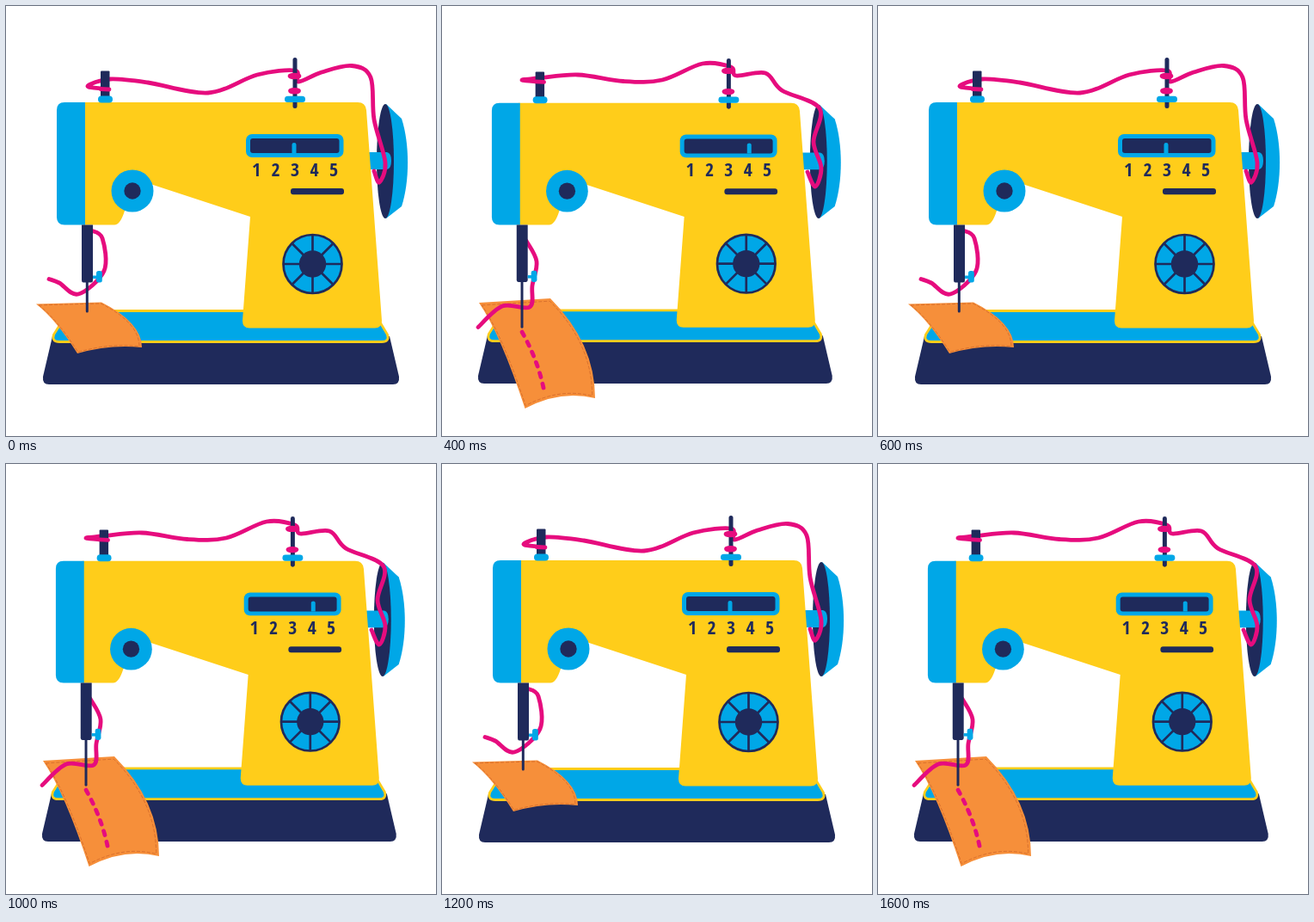
Recreate the animation shown at these times as an HTML page. Size 500 by 500 pixels, loop 1.8 s.

```html
<!DOCTYPE html>
<html lang="en">
<head>
<meta charset="utf-8">
<title>Sewing machine</title>
<style>
html, body { margin: 0; width: 100%; height: 100%; overflow: hidden; background: #fff; }
svg { display: block; width: 100vw; height: 100vh; }
.y { fill: #ffcd1a; }
.b { fill: #00a7e7; }
.n { fill: #1f2a5b; }
.navy { stroke: #1f2a5b; fill: none; }
.pink { stroke: #e60c7e; fill: none; stroke-width: 4.8; stroke-linecap: round; stroke-linejoin: round; }
.digits { font: 700 22px "Open Sans Condensed", "Noto Sans ExtraCondensed", "Noto Sans Condensed", "Open Sans", sans-serif; font-stretch: 62.5%; text-anchor: middle; }
</style>
</head>
<body>
<svg viewBox="0 0 500 500">
  <g class="machine">
    <path class="n" d="M54 384L43 431Q42 440 50 440H450Q458 440 457 431L446 384Z"/>
    <path class="b" d="M73 354.500H427L443.500 382Q446 390.500 437 390.500H62Q53 390.500 55.500 382Z" stroke="#ffcd1a" stroke-width="2.800"/>
    <path class="b" d="M442 114L460 131C469.500 160 469.500 204 460 233L442 247Z"/>
    <ellipse class="n" cx="441" cy="180.500" rx="10" ry="66.500"/>
    <path class="b" d="M418 170H443Q448 171 448 180T443 190H418Z"/>
    <path class="y" d="M90 112H409Q418 112 419 121L437 366Q437 374.500 429 374.500H283Q275 374.500 275 366L284 245L168 207L138 238Q133 254.500 126 254.500H90Z"/>
    <path class="b" d="M92 112H68Q59 112 59 121V245.500Q59 254.500 68 254.500H92Z"/>
    <circle class="b" cx="147" cy="215" r="24.500"/>
    <circle class="n" cx="147" cy="215" r="9.700"/>
    <rect class="b" x="279" y="149" width="113.500" height="27" rx="7"/>
    <rect class="n" x="284" y="154" width="103.500" height="17" rx="3"/>
    <path id="mark" class="b" d="M-2.500 171V161Q-2.500 159 0 159T2.500 161V171Z"/>
    <g id="digits" class="n digits"></g>
    <rect class="n" x="331" y="212" width="62" height="7.200" rx="3"/>
    <circle class="b" cx="356.500" cy="300" r="34"/>
    <g id="dial" class="navy" stroke-width="2.700"><circle cx="356.500" cy="300" r="34"/></g>
    <circle class="n" cx="356.500" cy="300" r="15.700"/>
  </g>
  <path id="cloth" fill="#f68f3a"/>
  <path id="hem" fill="none" stroke="#d96f2c" stroke-dasharray="4 2"/>
  <path id="seam" class="pink" stroke-dasharray="5 8"/>
  <path id="lower" class="pink"/>
  <path id="upper" class="pink"/>
  <g class="machine">
    <rect class="n" x="110" y="75.500" width="10.500" height="31" rx="1"/>
    <rect class="b" x="107" y="104.500" width="17" height="8" rx="4"/>
    <path class="navy" d="M336 62.500V116.500" stroke-width="5" stroke-linecap="round"/>
    <rect class="b" x="324" y="104.800" width="24" height="7.200" rx="3.500"/>
    <path class="n" d="M88 254.500H101V319Q101 321.500 99 321.500H90Q88 321.500 88 319Z"/>
    <path id="needle" class="navy" stroke-width="3" stroke-linecap="round"/>
    <path class="b" d="M101 313.500H107V317H101Z"/>
    <rect class="b" x="105" y="308" width="6.800" height="13.500" rx="2.500"/>
    <path id="hook" class="pink" d="M110 -.5L120 0"/>
    <ellipse id="coil" class="pink" cx="335.500" rx="5.500" ry="1.300"/>
    <ellipse class="pink" cx="335.500" cy="98.800" rx="5" ry="1.300"/>
  </g>
</svg>
<script>
const STEP = 200;
const $ = id => document.getElementById(id);
const parse = text => text.split(" ").map(s => s.split(",").map(Number));

// Smooth curve through key points
function curve(text) {
  const p = parse(text);
  let d = "M" + p[0];
  for (let i = 0; i < p.length - 1; i++) {
    const a = p[i - 1] || p[i], b = p[i], c = p[i + 1], e = p[i + 2] || c;
    const h1 = b.map((v, k) => v + (c[k] - a[k]) / 6);
    const h2 = c.map((v, k) => v - (e[k] - b[k]) / 6);
    d += `C${h1} ${h2} ${c}`;
  }
  return d;
}

// Curling cloth from its corners, shrunk towards the middle by size
function sheet(text, size) {
  const raw = parse(text);
  const mid = [0, 1].map(k => raw.reduce((sum, p) => sum + p[k], 0) / 4);
  const [a, b, c, d] = raw.map(p => p.map((v, k) => mid[k] + (v - mid[k]) * size));
  const between = (p, q, u, v) => [p[0] + (q[0] - p[0]) * u, p[1] + (q[1] - p[1]) * v];
  const right = between(b, c, 1, .45);
  const left = between(a, d, .47, .3);
  const foot = between(c, d, .5, .5);
  foot[1] -= (d[1] - a[1]) * .13;
  return `M${a}L${b}Q${right} ${c}Q${foot} ${d}Q${left} ${a}Z`;
}

const poses = [
  {
    move: "", mark: 335, needle: 355, hook: 97, coil: 81.5,
    cloth: "35,346.5 111,344.5 158,397 83,404",
    seam: "",
    lower: "99,261 112,270 114,308 84,335 62,322 50,317.5",
    upper: "112,96 95,93 121,85 165,89 235,101 292,80 336,75 340,88 367,77 402,69.5 424,83 428,132 441,182 434,205 428,192"
  },
  {
    move: "translate(2 2)", mark: 315, needle: 386, hook: 102.5, coil: 86,
    cloth: "45,348 123,345 170,432 96,441",
    seam: "M97.5 392.5q9 12 11.500 27",
    lower: "101,273 119,316 96,361 77,349 52,344 38,319 29.5,315",
    upper: "114,104 97,101 122,99 160,91 229,92 300,82 338,81 339,95 385,97 427,106 439,150 437,192 430,194"
  },
  {
    move: "translate(-.76 1.32) scale(.9945)", mark: 360, needle: 374, hook: 87.5, coil: 74.5,
    cloth: "43,345 126,340 178,456 96.5,468",
    seam: "M93 379q18 32 25 65",
    lower: "98,273 110,297 105,325 102,350 70,349 42,373.5",
    upper: "111,88 93,86 112,84 158,80 211,87.5 256,86 303,67 336,71 342,81 376,78 395,98 439,119 432,158 441,188 434,210 425,193"
  }
];

for (let i = 0; i < 5; i++) {
  $("digits").innerHTML += `<text x="${291 + 22.5 * i}" y="197.500">${i + 1}</text>`;
}
for (let a = 0; a < 180; a += 45) {
  $("dial").innerHTML += `<path d="M322.500 300H390.500" transform="rotate(${a} 356.500 300)"/>`;
}

const machine = document.querySelectorAll(".machine");
let shown = -1;

function draw(time) {
  const i = Math.floor(time / STEP) % poses.length;
  if (i === shown) return;
  shown = i;
  const p = poses[i];
  machine.forEach(g => g.setAttribute("transform", p.move));
  $("mark").setAttribute("transform", `translate(${p.mark} 0)`);
  $("hook").setAttribute("transform", `translate(0 ${p.hook})`);
  $("coil").setAttribute("cy", p.coil);
  $("needle").setAttribute("d", `M94.300 321V${p.needle}`);
  $("cloth").setAttribute("d", sheet(p.cloth, 1));
  $("hem").setAttribute("d", sheet(p.cloth, .95));
  $("seam").setAttribute("d", p.seam);
  $("lower").setAttribute("d", curve(p.lower));
  $("upper").setAttribute("d", curve(p.upper));
}

const start = performance.now();
function tick() {
  draw(performance.now() - start);
  requestAnimationFrame(tick);
}
tick();
</script>
</body>
</html>
```
